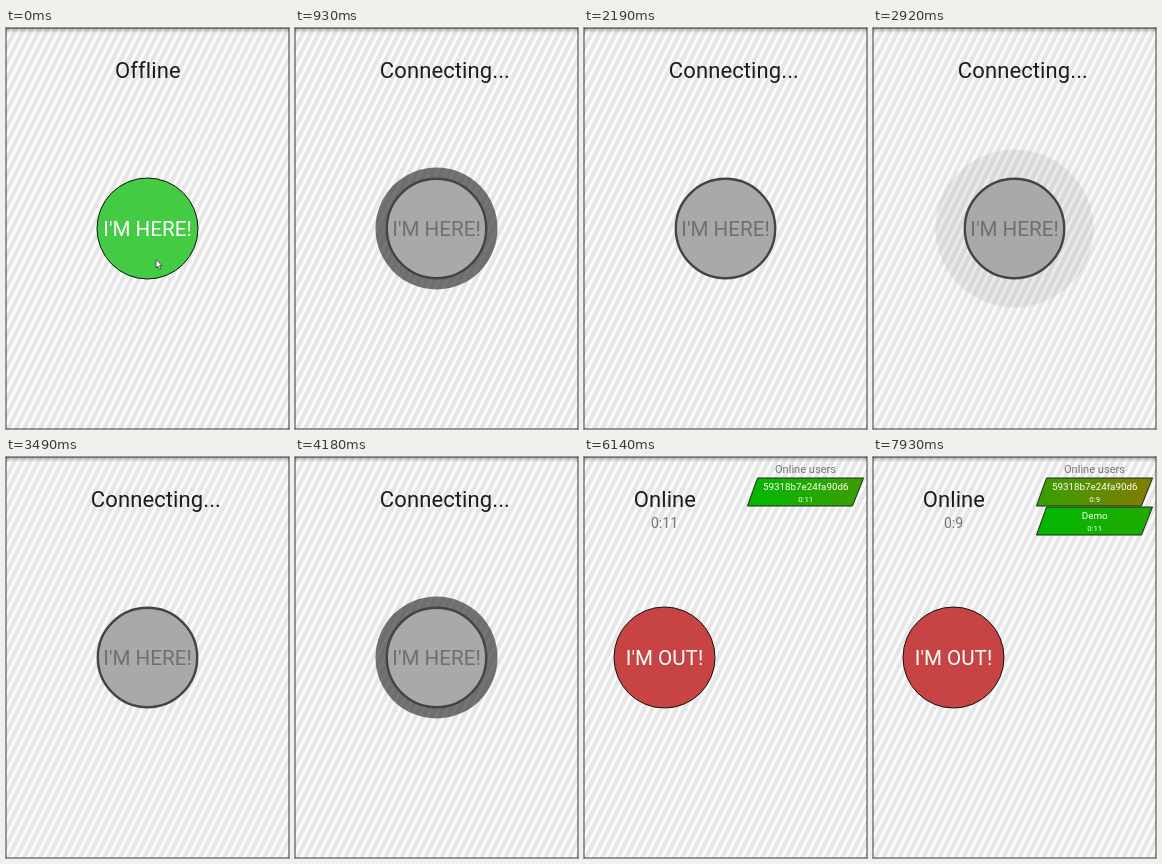
Recreate the animation shown at these times as an HTML page with a canvas. Size 283 px wide and 401 px high, loop 8 s.

```html
<!DOCTYPE html>
<html lang="en">
<head>
<meta charset="utf-8">
<title>Presence button</title>
<style>
  html, body { margin: 0; width: 100%; height: 100%; overflow: hidden; background: #fafafa; }
  canvas { display: block; width: 283px; height: 401px; }
</style>
</head>
<body>
<canvas id="stage"></canvas>
<script>
const W = 283, H = 401, LOOP = 8000;
const CLICK = 810, ONLINE = 4645, SLIDE = 500, PANEL = 122;
const canvas = document.getElementById("stage");
const scale = window.devicePixelRatio || 1;
canvas.width = Math.round(W * scale);
canvas.height = Math.round(H * scale);
const ctx = canvas.getContext("2d");
ctx.scale(scale, scale);

// The screen refreshes in bursts: [first, last, number of refreshes].
const bursts = [
  [0, 0, 1], [120, 540, 4], [810, 1500, 6], [1770, 2490, 6], [2780, 3760, 8],
  [3910, 3910, 1], [4180, 5090, 8], [5230, 6140, 8], [6280, 7240, 8], [7390, 7930, 5]
];
const ticks = bursts.flatMap(([a, b, n]) =>
  Array.from({ length: n }, (_, i) => a + (n > 1 ? (b - a) * i / (n - 1) : 0)));

const pulseStarts = [740, 1200, 1670, 2150, 2640, 3120, 3600, 4080, 4560];
const pulseSteps = [
  { until: 125, r: 61, alpha: 0.7 },
  { until: 225, r: 70, alpha: 0.38 },
  { until: 300, r: 79, alpha: 0.08 }
];

const users = [
  { name: "59318b7e24fa90d6", joined: 4200, shown: ONLINE },
  { name: "Demo", joined: 6800, shown: 6800 }
];

const clamp = (v, a, b) => Math.min(b, Math.max(a, v));
const easeInOut = p => 0.5 - Math.cos(Math.PI * clamp(p, 0, 1)) / 2;
const easeOut = p => 1 - (1 - clamp(p, 0, 1)) ** 2;
const clock = (t, start) => "0:" + (12 - Math.max(0, Math.floor((t - start) / 1000)));

function text(str, x, y, size, color, spacing = 0) {
  ctx.font = size + "px Roboto, sans-serif";
  ctx.letterSpacing = spacing + "px";
  ctx.textAlign = "center";
  ctx.fillStyle = color;
  ctx.fillText(str, x, y);
}

function disc(x, y, r, fill, stroke, width) {
  ctx.beginPath();
  ctx.arc(x, y, r, 0, Math.PI * 2);
  ctx.fillStyle = fill;
  ctx.fill();
  if (!stroke) return;
  ctx.strokeStyle = stroke;
  ctx.lineWidth = width;
  ctx.stroke();
}

function polygon(points) {
  ctx.beginPath();
  points.forEach(([x, y]) => ctx.lineTo(x, y));
  ctx.closePath();
}

function background() {
  ctx.fillStyle = "#fbfbfb";
  ctx.fillRect(0, 0, W, H);
  const lean = H / 2;
  ctx.fillStyle = "#e6e6e6";
  for (let x = 0; x < W + lean; x += 8) {
    polygon([[x, 0], [x + 4.8, 0], [x + 4.8 - lean, H], [x - lean, H]]);
    ctx.fill();
  }
}

function edges() {
  const shade = ctx.createLinearGradient(0, 0, 0, 5);
  shade.addColorStop(0, "rgba(0,0,0,.28)");
  shade.addColorStop(1, "rgba(0,0,0,0)");
  ctx.fillStyle = shade;
  ctx.fillRect(0, 0, W, 5);
  ctx.fillStyle = "rgba(0,0,0,.38)";
  ctx.fillRect(0, 0, W, 1);
  ctx.fillRect(0, 0, 1, H);
  ctx.fillRect(W - 1, 0, 1, H);
  ctx.fillRect(0, H - 1, W, 1);
}

function pulse(t, x) {
  if (t < CLICK || t >= ONLINE) return;
  const start = pulseStarts.filter(s => s <= t).pop();
  const step = pulseSteps.find(s => t - start < s.until);
  if (step) disc(x, 200.5, step.r, `rgba(60,60,60,${step.alpha})`);
}

function button(t, x) {
  const label = t < ONLINE ? "I'M HERE!" : "I'M OUT!";
  const waiting = t >= CLICK && t < ONLINE;
  if (waiting) disc(x, 200.5, 49.7, "#a9a9a9", "#444", 2.4);
  else disc(x, 200.5, 50.5, t < CLICK ? "#43cb43" : "#c84444", "#111", 1);
  text(label, x, 208, 20.6, waiting ? "#707070" : "#fff");
}

function ageColor(seconds) {
  const red = clamp(38 * seconds, 0, 200);
  return `rgb(${red},${184 - 0.45 * red},0)`;
}

function userCard(user, t, x, y) {
  const age = (t - user.joined) / 1000;
  const fill = ctx.createLinearGradient(x + 1, 0, x + 117, 0);
  fill.addColorStop(0, ageColor(age - 2.3));
  fill.addColorStop(1, ageColor(age - 0.3));
  polygon([[x + 12.5, y + 0.5], [x + 118.5, y + 0.5], [x + 107.5, y + 28.5], [x + 2.5, y + 28.5]]);
  ctx.fillStyle = fill;
  ctx.fill();
  ctx.strokeStyle = "#1c2a1c";
  ctx.lineWidth = 1;
  ctx.stroke();
  text(user.name, x + 60.7, y + 12.5, 9.8, "#fff");
  text(clock(t, user.joined), x + 60.7, y + 24, 7.8, "#fff");
}

function panel(t, width) {
  const x = W - width;
  text("Online users", x + 60.5, 16, 11.1, "#777");
  users.forEach((user, i) => {
    if (t < user.shown) return;
    ctx.globalAlpha = i ? clamp((t - user.shown + 100) / 300, 0, 1) : 1;
    userCard(user, t, x, 20.5 + 29 * i);
    ctx.globalAlpha = 1;
  });
}

function cursor(t) {
  const x = 150, y = 231.5 - 25 * easeOut(t / 540);
  polygon([[0, 0], [0, 8.5], [2, 6.8], [3.4, 10], [4.9, 9.3], [3.5, 6.2], [6, 6]]
    .map(([dx, dy]) => [x + dx, y + dy]));
  ctx.fillStyle = "#fff";
  ctx.fill();
  ctx.strokeStyle = "#333";
  ctx.lineWidth = 0.8;
  ctx.stroke();
}

function draw(t) {
  const width = PANEL * easeInOut((t - ONLINE) / SLIDE);
  const x = 141.5 - width / 2;
  const online = t >= ONLINE;
  background();
  edges();
  pulse(t, x);
  button(t, x);
  const status = online ? "Online" : t < CLICK ? "Offline" : "Connecting...";
  text(status, online || t < CLICK ? x + 0.4 : x + 8.4, 50, 22, "#1c1c1c", 0.1);
  if (online) {
    text(clock(t, users[0].joined), x, 71, 14, "#777");
    panel(t, width);
  }
  if (t < CLICK) cursor(t);
}

function loop() {
  const now = performance.now() % LOOP;
  draw(ticks.filter(k => k <= now).pop());
  requestAnimationFrame(loop);
}
loop();
</script>
</body>
</html>
```
